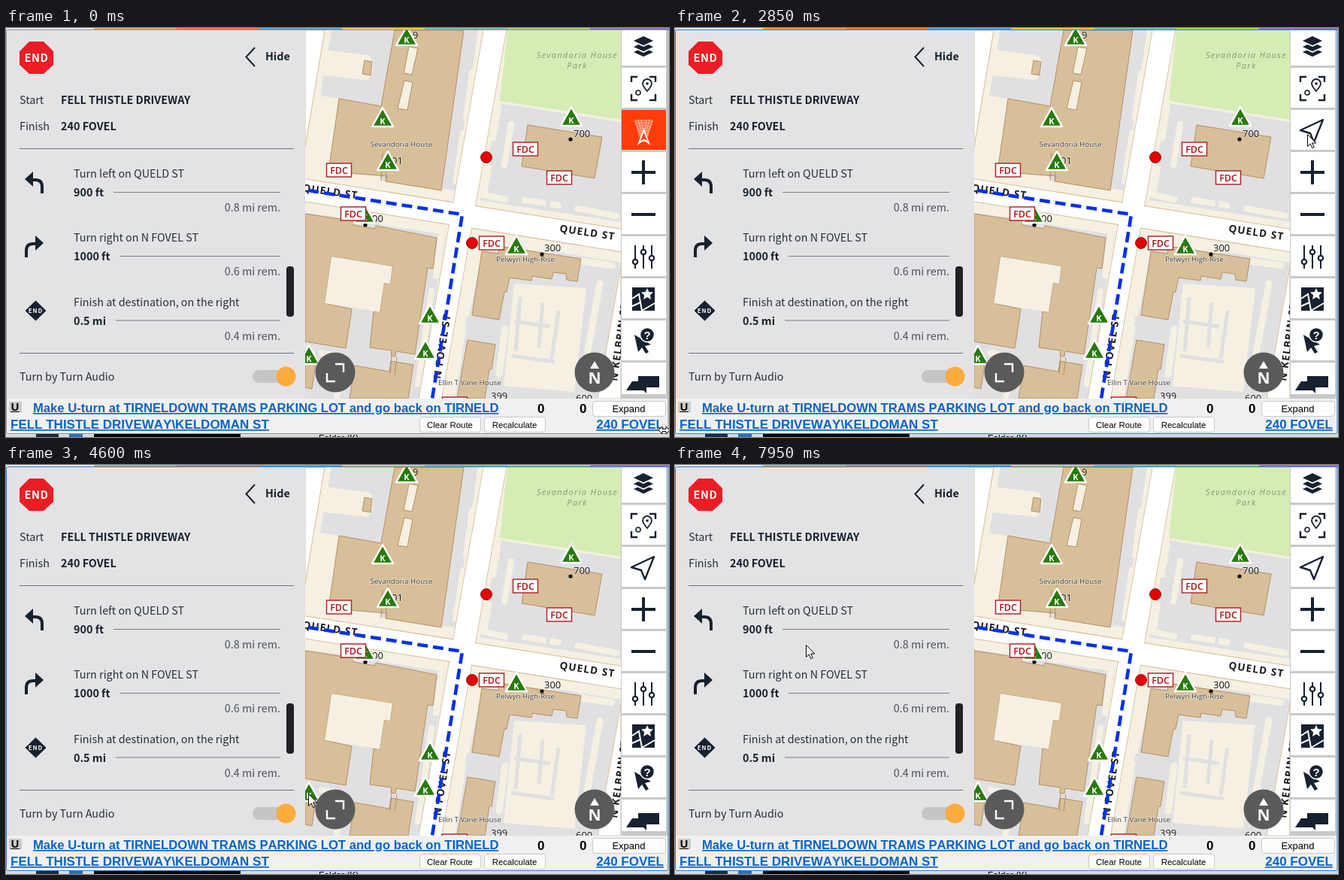
These frames come from a looping animation (882 by 544 pixels, 8000 ms). An HTML page:

```html
<!DOCTYPE html>
<html lang="en">
<head>
<meta charset="utf-8">
<title>Route guidance</title>
<style>
html, body { margin: 0; width: 100%; height: 100%; overflow: hidden; background: #dcdcdc; }
svg { display: block; width: 882px; height: 544px; }
.panel { font: 14.35px "Noto Sans CJK JP", "Noto Sans CJK SC", "Noto Sans CJK", sans-serif; fill: #262f3b; }
.panel .bold { font-weight: 700; fill: #17202c; }
.panel .rem { font-weight: 300; fill: #4a515b; text-anchor: end; }
.map { font-family: "Open Sans", "Noto Sans", sans-serif; }
.place { font-size: 9.8px; fill: #3c3c3c; text-anchor: middle; }
.park { font-size: 11px; font-style: italic; letter-spacing: 1.3px; fill: #7d9d72; text-anchor: middle; }
.street { font-size: 13.5px; font-weight: 700; letter-spacing: 1.2px; fill: #1b1b1b; }
.number { font-size: 13px; fill: #111; }
.street, .number, .place { paint-order: stroke; stroke: #fff; stroke-width: 1.5px; stroke-opacity: .55; }
.tag { font-size: 12.5px; font-weight: 600; fill: #a81217; text-anchor: middle; }
.key { font-size: 11px; font-weight: 700; fill: #fff; text-anchor: middle; }
.bar { font: 13px "Liberation Sans", sans-serif; font-kerning: none; fill: #000; }
.bar .strong { font-weight: 700; font-size: 17px; }
.bar .link { font-weight: 700; font-size: 17px; fill: #0a64c6; text-decoration: underline; }
</style>
</head>
<body>
<svg id="stage" viewBox="0 0 882 544"></svg>
<script>
const INK = '#17212f', TAN = '#d7bf99', GRASS = '#f5f0e2', PAVED = '#e0e0e2';

const rect = (x, y, w, h, fill, more = '') =>
  `<rect x="${x}" y="${y}" width="${w}" height="${h}" fill="${fill}" ${more}/>`;
const path = (d, fill = 'none', stroke = 'none', width = 1, more = '') =>
  `<path d="${d}" fill="${fill}" stroke="${stroke}" stroke-width="${width}" ${more}/>`;
const circle = (x, y, r, fill, more = '') =>
  `<circle cx="${x}" cy="${y}" r="${r}" fill="${fill}" ${more}/>`;
const text = (x, y, str, cls = '', more = '') =>
  `<text x="${x}" y="${y}" class="${cls}" ${more}>${str}</text>`;
const turned = (x, y, deg, str) =>
  text(0, 0, str, 'street', `transform="translate(${x} ${y}) rotate(${deg})"`);

const paved = d => path(d, PAVED);
const grass = d => path(d, GRASS);
const building = d => path(d, TAN, '#b58f63', 1);
const lawn = (d, width) => path(d, 'none', GRASS, width, 'stroke-linecap="round" stroke-linejoin="round"');
const road = (d, width) =>
  path(d, 'none', '#d3bd98', width + 2) + path(d, 'none', '#fff', width);
const dot = (x, y) => circle(x, y, 2.6, '#000');
const hydrant = (x, y) => circle(x, y, 7.5, '#e60000', 'stroke="#8c1a12"');
const tag = (x, y) =>
  rect(x - 16.5, y - 9, 33, 18, '#fff', 'stroke="#b0282b" stroke-width="1.5"') + text(x, y + 5, 'FDC', 'tag');
const keyBox = (x, y) =>
  path(`M${x} ${y - 14}l14 25h-28z`, '#277a0c', '#fff', 2.5, 'stroke-linejoin="round"') +
  text(x, y + 8, 'K', 'key');

function drawMap() {
  const ground = rect(398, 3, 420, 490, GRASS) +
    // north-west block
    paved('M433 3H628L597 216L500 203L443 94L418 90Z') +
    lawn('M424 36L480 43Q484 52 478 62L424 56Z', 14) + grass('M422 34L482 42L478 64L422 58Z') +
    lawn('M620 60L612 120M608 140L598 204', 8) +
    building('M443 94L499 104L517 3H609L579 216L505 204L507 197L429 191Z') +
    building('M477 43L487 45L485 63L474 61Z') +
    path('M536 25L548 27L540 62L529 60ZM530 70L541 72L534 109L521 107Z', GRASS, '#b58f63') +
    path('M501 166L499 203M508 160L505 204', 'none', '#b58f63') +
    // north-east block
    path('M667 3H818V122L657 97Z', '#d6ecb5') +
    paved('M656 100L818 125V258L631 229Z') +
    lawn('M655 104L648 146M642 186L636 222L664 228M690 229L735 236M760 240L812 250', 8) +
    lawn('M672 128L663 182', 8) +
    path('M724 213L720 240M757 219L753 246', 'none', PAVED, 5) +
    building('M694 129L793 145L783 200L686 184Z') +
    // south-west block
    paved('M398 240L585 270L550 493H398Z') +
    lawn('M400 242L460 250M500 258L580 270L572 330M566 350L548 474', 8) +
    building('M398 247L463 257L462 262L491 267L492 263L573 279L568 320L561 319L544 434L519 430L518 437L512 436L513 429L484 425L489 377L497 378L503 339L511 340L514 317L433 304L424 366L460 374L452 426L398 417Z') +
    grass('M433 304L514 317L511 340L503 339L497 378L486 376L460 372L424 366Z') +
    building('M398 444L412 447L407 480L398 478Z') +
    building('M464 449L510 457L512 443L542 448L535 493H457Z') +
    path('M513 437L511 460M520 438L517 461', 'none', '#b58f63') +
    lawn('M450 438L440 490M420 432L442 436', 8) +
    // south-east block
    paved('M632 281L818 312L787 493H592Z') +
    lawn('M632 284L612 380M608 398L594 486M660 290L720 298M765 310L806 316', 9) +
    lawn('M790 340L772 440M664 400L656 460', 9) +
    grass('M676 340L772 346L756 484L662 476Z') +
    path('M684 358L678 430M714 365L709 425M676 390L724 397M672 436L730 444M735 376L726 440', 'none', PAVED, 5) +
    building('M633 297L655 300L656 290L765 307L760 337L746 335L745 327L728 325L726 334L700 330L699 336L670 332L666 351L663 351L656 388L620 382Z') +
    building('M614 415L651 421L646 454L643 454L637 493H600Z');

  const roads =
    path('M398 3H424L398 158Z', '#fff', '#d3bd98') +
    path('M818 318L787 493H818Z', '#fff', '#d3bd98') +
    road('M652 -6L563 500', 29) + road('M380 213L840 286', 29) +
    path('M652 -6L563 500', 'none', '#fff', 29);

  const labels =
    text(526, 158, 'Sevandoria House', 'place') +
    text(691, 311, 'Pelwyn High-Rise', 'place') +
    text(617, 475, 'Ellin T Vane House', 'place') +
    text(760, 40, 'Sevandoria House', 'park') + text(760, 54, 'Park', 'park') +
    turned(394, 217, 8, 'QUELD ST') + turned(736, 271, 8.5, 'QUELD ST') +
    turned(578, 467, -81, 'N FOVEL ST') + turned(813, 470, -82, 'N KELBRIN ST') +
    text(755, 145, '700', 'number') + dot(751, 148) +
    text(716, 297, '300', 'number') + dot(713, 301) +
    text(645, 494, '399', 'number') + text(758, 497, '600', 'number') +
    text(513, 181, '01', 'number') + text(541, 14, '9', 'number') +
    text(487, 258, '00', 'number') + dot(478, 262);

  const route = path('M402 216L607 248L567 493', 'none', '#0530ee', 4.6, 'stroke-dasharray="14 7"');

  const marks = [[533, 12], [501, 120], [508, 178], [752, 119], [679, 290], [564, 382], [558, 429], [403, 436], [477, 248]]
    .map(p => keyBox(...p)).join('') +
    [[443, 189], [691, 161], [736, 199], [462, 247], [646, 286], [597, 500]].map(p => tag(...p)).join('') +
    hydrant(639, 172) + hydrant(620, 286);

  const controls =
    circle(438, 458, 26.5, '#5a5a5a') + circle(783, 458, 26.5, '#5a5a5a') +
    path('M438 447H449V458M427 459V470H438', 'none', '#fff', 2.4) +
    path('M783 443L789 453H777Z', '#fff') +
    text(783, 473, 'N', 'key', 'style="font-size:21px"');

  return `<g class="map" clip-path="url(#mapArea)">${ground}${roads}${labels}${route}${marks}${controls}</g>`;
}

function drawStep(y, line, distance, lineStart, remaining) {
  return text(90, y, line) + text(90, y + 25, distance, 'bold') +
    path(`M${lineStart} ${y + 19.5}H365`, 'none', '#7a7d82') +
    text(365, y + 45, remaining + ' mi rem.', 'rem');
}

function drawPanel() {
  const bend = path('M48 220V211Q48 202 39 202H32', 'none', INK, 4) + path('M25 201L36 191V211Z', INK);
  return `<g class="panel">` + rect(1, 3, 397, 490, '#e3e3e5') +
    path('M31 18H50L63 31V49L50 61H31L18 49V31Z', '#ee1c24') +
    text(40.5, 45, 'END', '', 'style="font-size:14.5px;font-weight:700;letter-spacing:.6px;fill:#fff;text-anchor:middle"') +
    path('M331 26L319.5 38.5L331 51', 'none', INK, 2) + text(345, 43, 'Hide', 'bold') +
    text(18, 101, 'Start') + text(73, 101, 'FELL THISTLE DRIVEWAY', 'bold') +
    text(18, 136, 'Finish') + text(73, 136, '240 FOVEL', 'bold') +
    path('M18 160.5H383M18 432.5H383', 'none', '#6f7277') +
    drawStep(199, 'Turn left on QUELD ST', '900 ft', 143, '0.8') +
    drawStep(284, 'Turn right on N FOVEL ST', '1000 ft', 151, '0.6') +
    drawStep(369.5, 'Finish at destination, on the right', '0.5 mi', 146, '0.4') +
    bend + `<g transform="translate(75 85) scale(-1 1)">${bend}</g>` +
    path('M39.5 363L53 376L39.5 389L26 376Z', INK, INK, 1, 'stroke-linejoin="round"') +
    text(39.5, 379, 'END', '', 'style="font-size:8px;font-weight:700;letter-spacing:1px;fill:#fff;text-anchor:middle"') +
    rect(373, 317, 10, 67, '#202126', 'rx="4"') +
    text(18, 469, 'Turn by Turn Audio') +
    rect(328, 455, 50, 17, '#c5c5c7', 'rx="8.5"') +
    circle(373, 463.5, 13, '#fdab3d', 'id="knob"') + '</g>';
}

function drawSidebar() {
  const slots = Array.from({ length: 9 }, (_, i) => {
    const top = Math.max(3, 56 * i - 3);
    return rect(819, top, 59, Math.min(56 * i + 50, 487) - top, '#fff');
  }).join('');
  const layer = y => path(`M848 ${y}L863 ${y + 7}L848 ${y + 14}L833 ${y + 7}Z`, INK, '#fff', 1.6);
  const beam = `<g id="beam">` + rect(819, 109, 59, 53, '#fe3d0a') +
    path('M836 122H861L852 152H844Z', '#fff', 'none', 0, 'opacity=".3"') +
    path('M837 124L846 148M841 122L847 144M845 122L848 140M852 122L849 140M856 122L850 144M860 124L851 148',
      'none', '#ffd5c8', 1.3, 'stroke-dasharray="2 1.5"') +
    path('M848.5 136L855 153L848.5 148.5L842 153Z', '#fe3d0a', '#fff', 2) + '</g>';
  return rect(818, 3, 62, 490, '#c9c9cb') + slots +
    layer(25) + layer(18) + layer(10) +
    path('M832 72V65H840M856 65H864V72M864 88V96H856M840 96H832V88', 'none', INK, 2.4) +
    path('M853 84Q847 77 847 74A6 6 0 0 1 859 74Q859 77 853 84Z', 'none', INK, 1.8) + circle(853, 74, 1.8, INK) +
    circle(841, 86, 3, 'none', `stroke="${INK}" stroke-width="1.6"`) +
    `<g id="nav">` + path('M862 122L832 136L845 140L850 152Z', 'none', INK, 2.4, 'stroke-linejoin="round"') + '</g>' + beam +
    path('M832 192H864M848 176V208M832 248H864', 'none', INK, 4) +
    path('M837 289V320M848 289V320M859 289V320', 'none', INK, 2) +
    [[837, 311], [848, 298], [859, 306]].map(p => circle(...p, 3.2, '#fff', `stroke="${INK}" stroke-width="2.2"`)).join('') +
    path('M833 345H863V376H833Z', INK) +
    path('M833 360L842 354L846 376M833 370L844 365M846 376L863 366', 'none', '#fff', 2) +
    path('M853 346L855.3 351L861 351.6L856.8 355.4L858 361L853 358L848 361L849.2 355.4L845 351.6L850.7 351Z', '#fff') +
    path('M836 408L858 421L850 423L855 431L851 433L846 425L841 431Z', INK) +
    circle(853, 408, 9.5, INK, 'stroke="#fff" stroke-width="1.5"') +
    text(853, 413.5, '?', 'bar', 'style="font-weight:700;font-size:15px;fill:#fff;text-anchor:middle"') +
    path('M841 463H869V478H852V486L848 482H825L833 470H841Z', INK);
}

function drawBar() {
  const button = (x, y, w, label, size) =>
    rect(x + .5, y + .5, w, 20, '#fdfdfd', 'rx="3.5" stroke="#c9c9c9"') +
    text(x + w / 2, y + 15, label, '', `style="font-size:${size}px;text-anchor:middle"`);
  return `<g class="bar">` + rect(1, 493, 879, 46, '#f0f0f0') +
    rect(4, 497, 17, 14, '#cbcbcb') +
    text(12, 509, 'U', '', 'style="font-weight:700;font-size:14.5px;text-anchor:middle"') +
    path('M6 510.5H18', 'none', '#000') +
    text(36, 511, 'Make U-turn at TIRNELDOWN TRAMS PARKING LOT and go back on TIRNELD', 'link', 'style="font-size:16.65px"') +
    text(6, 533, 'FELL THISTLE DRIVEWAY\\KELDOMAN ST', 'link') +
    text(875, 533, '240 FOVEL', 'link', 'text-anchor="end"') +
    text(707, 512, '0', 'strong') + text(763, 512, '0', 'strong') +
    button(780, 496, 97, 'Expand', 13) + button(550, 517, 81, 'Clear Route', 11.4) +
    button(636, 517, 81, 'Recalculate', 11.4) + '</g>';
}

function drawBackdrop() {
  const tabs = ['#e8e8e8', '#f9a04a', '#f3793f', '#56a6da', '#f7c65c', '#70c3a4', '#a8d06a', '#9273c4'];
  return tabs.map((c, i) => rect(i ? 7 + 110 * i : 0, 0, i ? 110 : 117, 3, c)).join('') +
    rect(0, 540, 882, 4, '#dadada') + rect(40, 540, 30, 4, '#1d2a3c') +
    rect(84, 540, 18, 4, '#2f6fb4') + rect(117, 540, 195, 4, '#070707') +
    text(416, 550, 'Folder (K)', 'bar', 'style="font-size:12px"');
}

document.getElementById('stage').innerHTML =
  '<defs><clipPath id="mapArea"><rect x="398" y="3" width="420" height="490"/></clipPath></defs>' +
  rect(0, 0, 882, 544, '#e6e6e6') + drawBackdrop() + drawMap() + drawPanel() + drawSidebar() + drawBar() +
  rect(.5, 2.5, 880.5, 537, 'none', 'id="frame" rx="2"') +
  `<g id="resize">${path('M868 535L873 530V533.5H878V530L883 535L878 540V536.5H873V540Z', '#fff', '#000')}</g>` +
  `<g id="arrow">${path('M.5 .5V16.5L4.2 13L6.8 18.7L9.2 17.6L6.7 12H11.8Z', '#fff', '#000')}</g>`;

const LOOP = 8000, STEP = 50, CLICK = 2600;
// time, x, y of the pointer tip
const pointer = [
  [0, 875, 535], [50, 872, 528], [450, 848, 400], [850, 828, 250], [1150, 809, 170], [1550, 840, 138],
  [2600, 840, 138], [2800, 841, 141], [3450, 841, 141], [3800, 838, 156], [4100, 838, 156],
  [4700, 367, 459], [4850, 369, 460], [5600, 369, 460], [6000, 363, 462], [7500, 363, 462], [7900, 174, 239], [8000, 174, 239]
];
// time, switch position
const toggle = [[0, 1], [5300, 1], [5600, 0], [7350, 0], [7650, 1], [8000, 1]];

const mix = (a, b, k) => a + (b - a) * k;
const ease = k => k * k * (3 - 2 * k);

function sample(table, time) {
  const i = table.findIndex((row, n) => n && time < row[0]);
  const from = table[i - 1], to = table[i];
  const k = ease((time - from[0]) / (to[0] - from[0]));
  return from.slice(1).map((v, n) => mix(v, to[n + 1], k));
}

const part = id => document.getElementById(id);
const [knob, beam, nav, frame, resize, arrow] =
  ['knob', 'beam', 'nav', 'frame', 'resize', 'arrow'].map(part);
const show = (el, on) => el.setAttribute('visibility', on ? 'visible' : 'hidden');
const ON = [253, 171, 61], OFF = [151, 151, 151];

function render(now) {
  const time = Math.floor((now % LOOP) / STEP) * STEP;
  const [x, y] = sample(pointer, time).map(Math.round);
  const [on] = sample(toggle, time);
  arrow.setAttribute('transform', `translate(${x} ${y})`);
  show(resize, time < STEP);
  show(arrow, time >= STEP);
  show(beam, time < CLICK);
  show(nav, time >= CLICK);
  frame.setAttribute('stroke', time < CLICK ? '#8f9296' : '#2b7fce');
  knob.setAttribute('cx', mix(341, 372.5, on));
  knob.setAttribute('fill', `rgb(${OFF.map((v, n) => Math.round(mix(v, ON[n], on)))})`);
}

const start = performance.now();
function tick() {
  render(performance.now() - start);
  requestAnimationFrame(tick);
}
tick();
</script>
</body>
</html>
```
